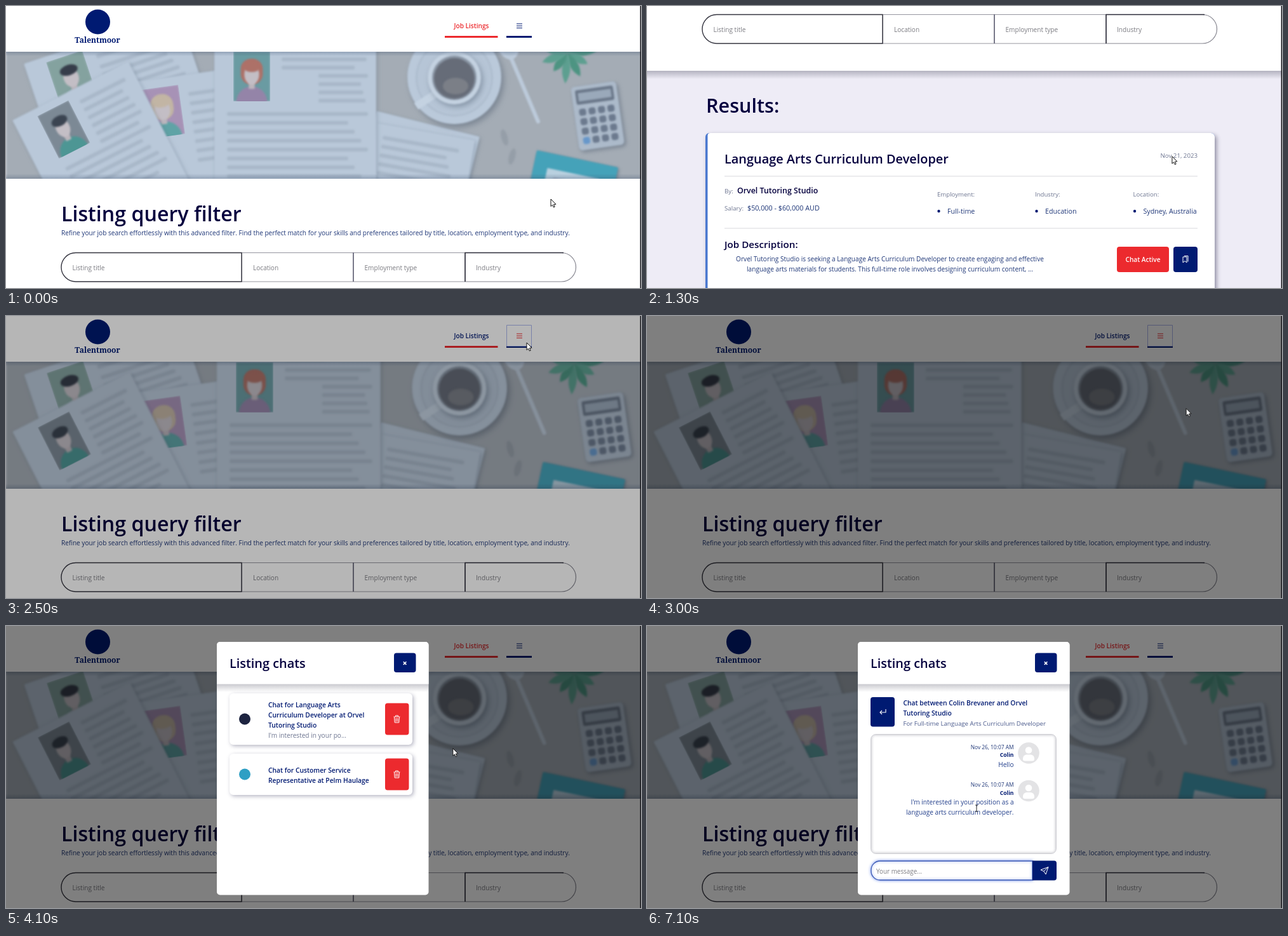
These frames come from a looping animation (1000x444 px, 7200 ms). An HTML page with a canvas:

```html
<!DOCTYPE html>
<html lang="en">
<head>
<meta charset="utf-8">
<title>Job listings</title>
<style>
  html, body { margin: 0; width: 100%; height: 100%; overflow: hidden; background: #fff; }
  canvas { display: block; width: 100vw; height: 100vh; }
</style>
</head>
<body>
<canvas id="stage" width="1000" height="444"></canvas>
<script>
const W = 1000, H = 444, LOOP = 7200;
const NAVY = '#001a72', INK = '#05003e', BLUE = '#1f3778', RED = '#ec2a2e', SOFT = '#6d7590';
const SANS = '"Open Sans", "Noto Sans", sans-serif';
const FIRM = 'Orvel Tutoring Studio', USER = 'Colin';

const makeCanvas = () => Object.assign(document.createElement('canvas'), { width: W, height: H });
const screen2d = document.getElementById('stage').getContext('2d');
const heroArt = makeCanvas(), modalLayer = makeCanvas();
const modal2d = modalLayer.getContext('2d');
let g = screen2d;

const clamp = v => Math.max(0, Math.min(1, v));
const ramp = (t, a, b) => clamp((t - a) / (b - a));
const smooth = u => u * u * (3 - 2 * u);

// ---------- drawing helpers ----------
function text(s, x, y, size, color, weight = 400, align = 'left', family = SANS) {
  g.font = `${weight} ${size}px ${family}`;
  g.textAlign = align;
  g.fillStyle = color;
  g.fillText(s, x, y);
}

function rect(x, y, w, h, color) {
  g.fillStyle = color;
  g.fillRect(x, y, w, h);
}

function box(x, y, w, h, r, fill, stroke, lw = 1) {
  g.beginPath();
  g.roundRect(x, y, w, h, r);
  if (fill) { g.fillStyle = fill; g.fill(); }
  if (stroke) { g.strokeStyle = stroke; g.lineWidth = lw; g.stroke(); }
}

function disc(x, y, rx, color, ry = rx, rot = 0) {
  g.beginPath();
  g.ellipse(x, y, rx, ry, rot, 0, Math.PI * 2);
  g.fillStyle = color;
  g.fill();
}

function path(points, stroke, lw = 1, fill) {
  g.beginPath();
  for (let i = 0; i < points.length; i += 2) g.lineTo(points[i], points[i + 1]);
  if (fill) { g.closePath(); g.fillStyle = fill; g.fill(); }
  if (stroke) { g.strokeStyle = stroke; g.lineWidth = lw; g.stroke(); }
}

function shadow(color, blur, dx, dy, draw) {
  g.save();
  Object.assign(g, { shadowColor: color, shadowBlur: blur, shadowOffsetX: dx, shadowOffsetY: dy });
  draw();
  g.restore();
}

function fade(x, y, w, h, from, to) {
  const grad = g.createLinearGradient(0, y, 0, y + h);
  grad.addColorStop(0, from);
  grad.addColorStop(1, to);
  rect(x, y, w, h, grad);
}

function placed(x, y, deg, draw) {
  g.save();
  g.translate(x, y);
  g.rotate(deg * Math.PI / 180);
  draw();
  g.restore();
}

// ---------- hero illustration ----------
const PAPER = '#b9c8d9', RULE = '#a9b8c9';

function sheet(w, h, r = 2) {
  shadow('rgba(80,95,115,.3)', 6, 2, 2, () => box(0, 0, w, h, r, PAPER));
}

function rules(x, y, w, n, gap, h = 6) {
  for (let i = 0; i < n; i++) box(x, y + i * gap, w * (1 - .14 * (i * 7 % 4) / 3), h, 3, RULE);
}

function portrait(w, h, back, hair, shirt, long) {
  g.save();
  g.beginPath();
  g.rect(0, 0, w, h);
  g.clip();
  rect(0, 0, w, h, back);
  if (long) box(w * .2, h * .14, w * .6, h * .52, w * .28, hair);
  disc(w / 2, h * 1.02, w * .42, shirt, h * .32);
  rect(w * .42, h * .55, w * .16, h * .2, '#bdb6bd');
  disc(w / 2, h * .46, w * .2, '#c3bec5', h * .2);
  disc(w / 2, h * .3, w * .24, hair, h * .11);
  g.restore();
}

function leaf(deg, len, color) {
  placed(884, 74, deg, () => {
    g.beginPath();
    g.moveTo(0, 0);
    g.quadraticCurveTo(len * .55, -13, len, 0);
    g.quadraticCurveTo(len * .55, 13, 0, 0);
    g.fillStyle = color;
    g.fill();
  });
}

function drawHero() {
  g = heroArt.getContext('2d');
  g.filter = 'blur(1.4px)';
  rect(0, 0, W, H, '#a4acb5');

  placed(28, 91, -18.5, () => {
    sheet(257, 300);
    placed(34, 9, 0, () => portrait(60, 76, '#84a29f', '#363d4a', '#a9bccb'));
    rules(112, 22, 70, 1, 12, 7);
    rules(112, 40, 125, 5, 13);
  });
  placed(184, 122, -8, () => {
    sheet(240, 240);
    placed(26, 14, 0, () => portrait(60, 78, '#a792b6', '#c2b5a4', '#5fa3a6', true));
    rules(100, 28, 120, 8, 15);
  });
  placed(10, 180, -27, () => {
    sheet(205, 260);
    placed(38, 12, 0, () => portrait(55, 75, '#7c8995', '#3b4451', '#4d9694'));
    rules(108, 20, 80, 6, 14);
    rules(40, 104, 150, 6, 14);
  });
  placed(583, 165, 14, () => { sheet(168, 160); rules(14, 22, 134, 8, 14); });
  placed(583, 184, 10, () => { sheet(158, 150); rules(14, 18, 122, 7, 14); });

  placed(328, 47, 0, () => {
    sheet(255, 260);
    placed(30, 25, 0, () => portrait(58, 78, '#6a9ba2', '#ad7168', '#9484a8', true));
    rules(106, 16, 64, 1, 10, 8);
    rules(106, 34, 134, 2, 13);
    rules(164, 60, 78, 4, 13);
    rules(20, 120, 222, 8, 14);
  });

  // Cup, saucer and spoon
  shadow('rgba(60,75,95,.4)', 10, 4, 5, () => disc(706, 112, 74, '#bac9da'));
  disc(706, 113, 61, '#afbecf');
  disc(706, 113, 58, '#b6c5d6');
  path([680, 136, 646, 158], '#c4d2e1', 12);
  shadow('rgba(60,75,95,.4)', 8, 3, 4, () => disc(706, 113, 42, '#c4d2e1'));
  disc(706, 113, 35, '#8b97a6');
  disc(706, 114, 32, '#666c78');
  disc(708, 126, 20, '#7b7f87', 13);
  g.lineCap = 'round';
  path([792, 74, 838, 182], '#bccada', 6);
  disc(790, 62, 16, '#bccada', 23, -.4);
  disc(790, 62, 11, '#b6c5d5', 17, -.4);

  // Plant
  for (let i = 0; i < 11; i++)
    leaf(-170 + i * 33, 36 + i % 3 * 6, i % 2 ? '#4d9482' : '#5d9f90');

  // Calculator
  placed(889, 128, -8, () => {
    shadow('rgba(60,75,95,.4)', 6, 3, 3, () => box(0, 0, 72, 101, 6, '#acbaca'));
    box(6, 6, 60, 23, 3, '#6b788a');
    box(10, 11, 52, 13, 1, '#9aa9ba');
    for (let i = 0; i < 16; i++)
      box(8 + i % 4 * 15, 36 + (i >> 2) * 15, 11, 11, 4, i === 12 ? '#6797ca' : '#6c7a8e');
  });

  disc(785, 207, 5, '#959ea8', 13, -.25);
  disc(797, 237, 5, '#959ea8', 13, .25);

  // Teal folder
  placed(836, 227, 12, () => {
    shadow('rgba(60,75,95,.4)', 5, 2, 2, () => box(0, 0, 131, 80, 2, '#45a2b9'));
    box(22, 24, 84, 60, 1, '#b9d0df');
    rules(34, 36, 60, 3, 12);
  });
}

// ---------- page ----------
function header(menuOpen) {
  rect(0, 0, W, 72, '#fff');
  disc(144.5, 25, 19.5, NAVY);
  text('Talentmoor', 144, 58, 12, NAVY, 900, 'center', '"Noto Serif", serif');
  text('Job Listings', 733, 35, 10.1, menuOpen ? NAVY : RED, 600, 'center');
  rect(691, 47, 83.5, 3, RED);
  rect(788, 47, 40, 3, NAVY);
  for (let i = 0; i < 3; i++) rect(804, 27.5 + i * 3.3, 9, 1, menuOpen ? RED : NAVY);
  if (menuOpen) box(788.5, 14.5, 39, 33, 0, null, '#a9b4ec');
}

function hero(scroll, zoom) {
  g.save();
  g.beginPath();
  g.rect(0, 72 - scroll, W, 200);
  g.clip();
  g.drawImage(heroArt, 0, 0, W * zoom, H * zoom);
  fade(0, 72 - scroll, W, 7, 'rgba(60,80,110,.3)', 'rgba(60,80,110,0)');
  fade(0, 264 - scroll, W, 8, 'rgba(60,80,110,0)', 'rgba(60,80,110,.3)');
  g.restore();
}

function filterForm() {
  rect(0, 272, W, 205, '#fff');
  fade(0, 477, W, 13, 'rgba(60,60,80,.33)', 'rgba(60,60,80,0)');
  text('Listing query filter', 87, 339, 32.2, INK, 600);
  text('Refine your job search effortlessly with this advanced filter. Find the perfect match for your skills ' +
    'and preferences tailored by title, location, employment type, and industry.', 87, 361, 10.1, BLUE);
  box(371.5, 388.5, 175.5, 45.5, 0, null, '#96969f');
  box(547, 388.5, 176, 45.5, 0, null, '#96969f');
  path([547, 388, 547, 434], '#55556c', 1.2);
  box(87, 388.5, 284, 45.5, [23, 0, 0, 23], null, '#34343f', 1.4);
  box(723, 388.5, 174.5, 45.5, [0, 23, 23, 0], null, '#85858f', 1.2);
  path([723, 434, 723, 388.5, 878, 388.5], '#2b2b38', 1.4);
  text('Listing title', 104.5, 416, 10.1, '#7c7c82');
  text('Location', 389, 416, 10.1, '#7c7c82');
  text('Employment type', 564.5, 416, 10.1, '#7c7c82');
  text('Industry', 740, 416, 10.1, '#7c7c82');
}

function fact(x, label, value) {
  text(label, x, 675, 9.6, SOFT);
  disc(x + 2.5, 698, 2.2, NAVY);
  text(value, x + 16, 702, 10.7, BLUE);
}

function results() {
  text('Results:', 93, 543, 30.6, INK, 600);
  shadow('rgba(50,50,80,.5)', 7, 3, 3, () => box(92, 575, 802, 259, 6, '#4a78cf'));
  box(95.5, 575, 798.5, 259, [4, 6, 6, 4], '#fff');
  text('Language Arts Curriculum Developer', 122, 623, 19.9, INK, 600);
  text('Nov 21, 2023', 867, 614, 9.7, SOFT, 400, 'right');
  rect(122, 642.5, 745, 1, '#d9d9de');
  rect(122, 724.5, 745, 1, '#d9d9de');
  text('By:', 122, 670, 9.7, SOFT);
  text(FIRM, 142, 670, 12.4, INK, 600);
  text('Salary:', 122, 697, 9.7, SOFT);
  text('$50,000 - $60,000 AUD', 158, 697, 10.8, BLUE);
  fact(457, 'Employment:', 'Full-time');
  fact(611, 'Industry:', 'Education');
  fact(765.5, 'Location:', 'Sydney, Australia');
  text('Job Description:', 122, 756, 15.2, INK, 600);
  text(FIRM + ' is seeking a Language Arts Curriculum Developer to create engaging and effective',
    382.5, 777, 10.1, BLUE, 400, 'center');
  text('language arts materials for students. This full-time role involves designing curriculum content, ...',
    382.5, 793, 10.1, BLUE, 400, 'center');
  box(740, 754, 82, 40, 4, RED);
  text('Chat Active', 781, 778, 10.1, '#fff', 600, 'center');
  box(829, 754, 38, 40, 4, NAVY);
  path([844, 779, 844, 770, 850, 770, 850, 779, 847, 776.5, 844, 779], '#fff');
  path([846, 768.5, 852, 768.5, 852, 777.5], '#fff');
}

function page(t, scroll) {
  const menuOpen = t >= 2380 && t < 3430;
  rect(0, 0, W, H, '#eeecf6');
  hero(scroll, t >= 2420 ? 1.0115 : 1);
  g.save();
  g.translate(0, -scroll);
  header(menuOpen);
  filterForm();
  results();
  g.restore();
}

// ---------- modal ----------
function trash(x, y) {
  path([x - 5, y - 3.5, x + 5, y - 3.5], '#fff');
  path([x - 2, y - 4, x - 2, y - 5.5, x + 2, y - 5.5, x + 2, y - 4], '#fff');
  path([x - 4, y - 3, x - 3.3, y + 5.5, x + 3.3, y + 5.5, x + 4, y - 3], '#fff');
  for (let i = -1; i < 2; i++) path([x + i * 1.8, y - 1.5, x + i * 1.8, y + 4], '#fff', .8);
}

function chatCard(y, h, mark, lines, first) {
  shadow('rgba(40,40,80,.35)', 6, 2, 2, () => box(352, y, 288, h, 6, '#fff'));
  disc(376, y + h / 2, 9, mark);
  lines.forEach((s, i) => text(s, 413, first + i * 16, 10.3, NAVY, 600));
  box(597, y + h / 2 - 25, 37.5, 50, 4, RED);
  trash(615.5, y + h / 2);
}

function chatList() {
  chatCard(106, 81, '#1d2440',
    ['Chat for Language Arts', 'Curriculum Developer at Orvel', 'Tutoring Studio'], 127.5);
  text("I'm interested in your po...", 413, 175.5, 10.1, SOFT);
  chatCard(201, 65, '#2f9fc4', ['Chat for Customer Service', 'Representative at Pelm Haulage'], 230.5);
}

function message(y, lines) {
  text('Nov 26, 10:07 AM', 577.5, y, 8.4, BLUE, 400, 'right');
  text(USER, 577.5, y + 12.7, 8.6, NAVY, 700, 'right');
  lines.forEach((s, i) => text(s, 577.5, y + 28 + i * 16, 10.1, '#24408c', 400, 'right'));
  g.save();
  g.beginPath();
  g.arc(601, y + 6.5, 16.8, 0, Math.PI * 2);
  g.clip();
  rect(580, y - 12, 42, 40, '#e3e3e5');
  disc(601, y + 2, 5.3, '#fff');
  box(592, y + 9, 18, 10, [6, 6, 3, 3], '#fff');
  g.restore();
}

function chatRoom() {
  box(352, 112, 38, 46.5, 4, NAVY);
  path([376, 131, 376, 136, 367, 136], '#fff', 1.1);
  path([370, 133, 367, 136, 370, 139], '#fff', 1.1);
  text('Chat between Colin Brevaner and Orvel', 403.5, 124.5, 10.3, NAVY, 600);
  text('Tutoring Studio', 403.5, 140.5, 10.3, NAVY, 600);
  text('For Full-time Language Arts Curriculum Developer', 403.5, 156.5, 9.67, '#4a5a8c');

  // Soft inner edge of the conversation frame
  for (let i = 0; i < 6; i++)
    box(352.5 + i, 170.5 + i, 292 - 2 * i, 188 - 2 * i, 8 - i, null, `rgba(70,70,90,${.26 * (1 - i / 6) ** 2})`);
  message(193.5, ['Hello']);
  message(253, ["I'm interested in your position as a", 'language arts curriculum developer.']);

  shadow('rgba(70,110,230,.7)', 4, 0, 0, () =>
    box(353, 370, 254, 30, [14, 0, 0, 14], '#fff', '#3b59b4', 1.3));
  text('Your message...', 361, 389.5, 9.9, '#7c7c82');
  box(607, 369.5, 38, 31, [0, 4, 4, 0], NAVY);
  path([620, 384, 632, 379.5, 628, 391, 624.8, 386.2, 620, 384], '#fff');
  path([624.8, 386.2, 632, 379.5], '#fff');
}

function modal(t) {
  g = modal2d;
  g.clearRect(0, 0, W, H);
  g.save();
  box(332, 25, 333.5, 398.5, 5, '#fff');
  g.clip();
  if (t < 5000) chatList();
  else if (t >= 5650) chatRoom();
  fade(332, 91, 334, 13, 'rgba(50,50,70,.27)', 'rgba(50,50,70,0)');
  rect(332, 25, 334, 66.5, '#fff');
  g.restore();
  text('Listing chats', 352, 66, 19.9, INK, 600);
  box(611, 42.5, 34.5, 30.5, 4, NAVY);
  path([625.8, 56.3, 630.4, 60.9], '#fff', 1.6);
  path([630.4, 56.3, 625.8, 60.9], '#fff', 1.6);
  g = screen2d;

  const rise = 1 - ramp(t, 3430, 3730);
  g.globalAlpha = ramp(t, 3435, 3585);
  g.drawImage(modalLayer, 0, -41.6 * rise * rise);
  g.globalAlpha = 1;
}

// ---------- pointer ----------
const TRACK = [
  [0, 858, 304], [100, 858, 304], [900, 833, 275], [1600, 823, 212], [2350, 820, 42], [2650, 820, 42],
  [3300, 872, 227], [3600, 872, 227], [4700, 484, 148], [4950, 484, 148], [5300, 484, 175],
  [5600, 484, 175], [6250, 603, 365], [6350, 603, 365], [6850, 519, 287], [LOOP, 519, 287]
];

function pointer(t) {
  const i = TRACK.findIndex((k, n) => n && t <= k[0]);
  const [t0, x0, y0] = TRACK[i - 1], [t1, x1, y1] = TRACK[i];
  const u = smooth(ramp(t, t0, t1));
  const x = x0 + (x1 - x0) * u, y = y0 + (y1 - y0) * u;
  g.save();
  g.translate(x, y);
  if (t < 5000) {
    path([0, 0, 0, 11.5, 2.6, 9.2, 4.4, 13, 6.2, 12.2, 4.5, 8.4, 8, 8.2, 0, 0], '#111', 1, '#fff');
  } else {
    path([0, -4.5, 0, 4.5], '#222');
    path([-2, -5, 2, -5], '#222');
    path([-2, 5, 2, 5], '#222');
  }
  g.restore();
}

// ---------- timeline ----------
function scrollAt(t) {
  return Math.round(400 * (smooth(ramp(t, 100, 800)) - smooth(ramp(t, 1200, 1859))));
}

function dim(alpha) {
  if (alpha > 0) rect(0, 0, W, H, `rgba(0,0,0,${alpha})`);
}

function draw(t) {
  g = screen2d;
  g.clearRect(0, 0, W, H);
  page(t, scrollAt(t));
  dim(.5 * ramp(t, 2415, 2565) * (1 - ramp(t, 3500, 3650)));
  dim(.5 * ramp(t, 3430, 3580));
  if (t > 3430) modal(t);
  pointer(t);
  rect(998.6, 0, 1.4, H, '#15151a');
}

drawHero();
const start = performance.now();
function tick() {
  draw((performance.now() - start) % LOOP);
  requestAnimationFrame(tick);
}
tick();
</script>
</body>
</html>
```
